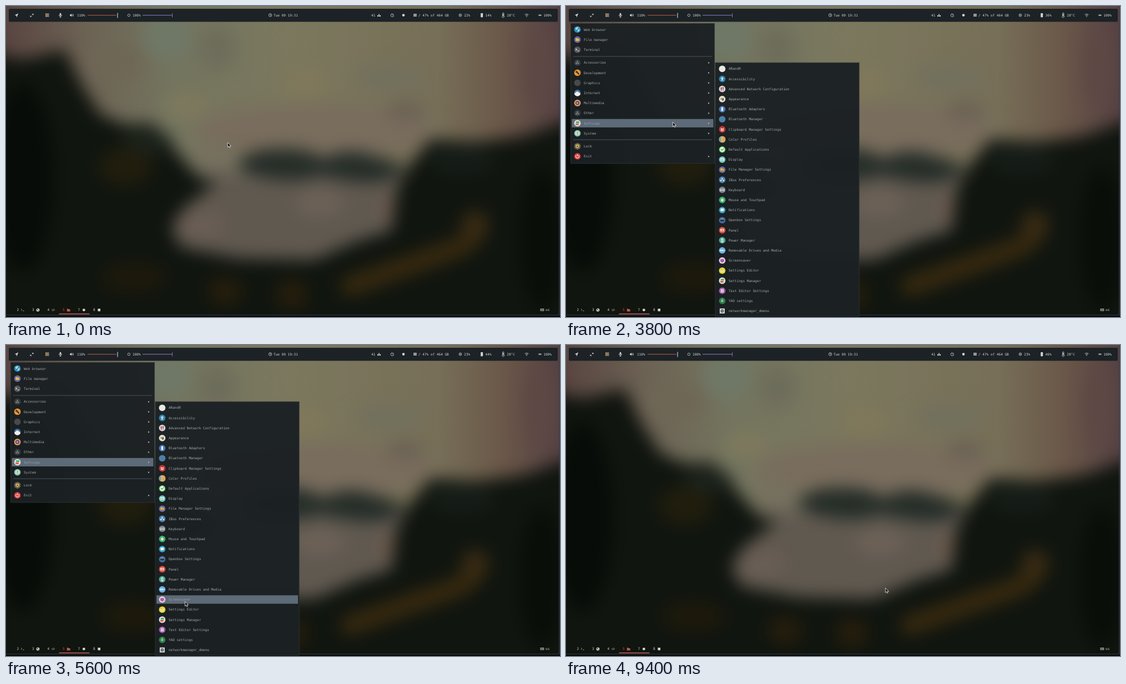
An HTML page that plays this animation: 998x561 px, repeating every 9.9 s.

```html
<!DOCTYPE html>
<html lang="en">
<head>
<meta charset="utf-8">
<title>Desktop menu</title>
<style>
html, body { margin: 0; width: 100%; height: 100%; overflow: hidden; background: #0a0f0c; }
svg { position: absolute; inset: 0; width: 100%; height: 100%; }
text { font: 6.07px "DejaVu Sans Mono", monospace; text-rendering: geometricPrecision; white-space: pre; }
.blur { filter: blur(15px); }
.bar { fill: #d3d6d1; }
.bar .line { fill: none; stroke: #d3d6d1; stroke-width: .8; }
.menu { fill: #a7abaa; }
.box { fill: #1b2124; fill-opacity: .97; stroke: #30383b; stroke-width: .8; }
.pick { fill: #5d6a77; }
.on { fill: #98a1a7; }
</style>
</head>
<body>
<svg viewBox="0 0 998 561" preserveAspectRatio="none">
  <defs>
    <linearGradient id="sky">
      <stop stop-color="#594541"/><stop offset=".14" stop-color="#6c6254"/>
      <stop offset=".3" stop-color="#74755f"/><stop offset=".52" stop-color="#7b785e"/>
      <stop offset=".78" stop-color="#776f57"/><stop offset=".9" stop-color="#6a5749"/>
      <stop offset="1" stop-color="#564143"/>
    </linearGradient>
  </defs>
  <rect width="998" height="561" fill="url(#sky)"/>
  <g class="blur">
    <ellipse cx="290" cy="55" rx="45" ry="45" fill="#6f7866"/>
    <ellipse cx="380" cy="75" rx="35" ry="40" fill="#6d6d5b"/>
    <ellipse cx="200" cy="100" rx="50" ry="35" fill="#6f6756"/>
    <ellipse cx="690" cy="130" rx="60" ry="25" fill="#72705d"/>
    <ellipse cx="560" cy="225" rx="220" ry="50" fill="#796d5d"/>
    <ellipse cx="720" cy="190" rx="35" ry="18" fill="#6c6255"/>
    <ellipse cx="325" cy="180" rx="40" ry="25" fill="#7d795d"/>
    <ellipse cx="540" cy="140" rx="36" ry="26" fill="#81785a"/>
    <ellipse cx="380" cy="270" rx="40" ry="30" fill="#76705f"/>
    <ellipse cx="960" cy="110" rx="25" ry="70" fill="#5d4845"/>
    <path d="M300 300H720V470H280z" fill="#605950"/>
    <ellipse cx="350" cy="395" rx="45" ry="30" fill="#695d54"/>
    <ellipse cx="565" cy="355" rx="45" ry="25" fill="#6c6157"/>
    <ellipse cx="685" cy="365" rx="16" ry="24" fill="#6a584c"/>
    <path d="M-60 78L30 96 105 78 135 140 170 195 215 214 265 212 310 265 350 312 380 318 320 365 298 400 315 435 420 455 555 458 630 425 695 405 703 335 725 290 765 240 850 245 930 235 1060 190V640H-60z" fill="#10150f"/>
    <path d="M415 285q20-28 80-28t75 20q35-22 75-12t75 25q-30 33-80 28t-70-14q-40 16-90 8t-65-27z" fill="#252d28"/>
    <ellipse cx="30" cy="310" rx="55" ry="170" fill="#070c08"/>
    <ellipse cx="255" cy="245" rx="45" ry="22" fill="#1c231c"/>
    <ellipse cx="820" cy="275" rx="60" ry="25" fill="#161d18"/>
    <ellipse cx="215" cy="290" rx="50" ry="35" fill="#201d0d"/>
    <ellipse cx="230" cy="490" rx="60" ry="28" fill="#1d190c"/>
    <ellipse cx="395" cy="515" rx="32" ry="26" fill="#251d0c"/>
    <ellipse cx="515" cy="520" rx="30" ry="28" fill="#251d0c"/>
    <path d="M620 505Q720 470 790 445T845 392" fill="none" stroke="#37290f" stroke-width="36" stroke-linecap="round"/>
    <ellipse cx="845" cy="392" rx="25" ry="22" fill="#3a2b14"/>
    <ellipse cx="965" cy="420" rx="40" ry="130" fill="#0a0e09"/>
  </g>
  <path d="M0 557.5H996.5V0" fill="none" stroke="#343c4c"/>
  <path d="M0 558.5H998V561H0z" fill="#080a0b"/>
</svg>
<svg viewBox="0 0 998 561" preserveAspectRatio="none">
  <g class="bar">
    <rect x="5" y="5" width="989" height="23.5" rx="2" fill="#1c2225"/>
    <path d="M22.3 13.3L15.7 16.6 18.6 17.2 19.2 20.4z"/>
    <path d="M46.6 13.9H49.5V16.8zM43.5 16.9V19.8H46.4z"/>
    <path class="line" d="M44.5 18.8L46 17.3M47 16.3L48.6 14.8"/>
    <path d="M71 14.4H77.4M71 16.6H77.4M71 18.8H77.4" fill="none" stroke="#dcb886" stroke-width="1.6" stroke-dasharray="1.7 .6"/>
    <rect x="96.7" y="12.8" width="2.7" height="4.8" rx="1.3"/>
    <path class="line" d="M95.4 16q.1 2.8 2.6 2.8t2.6-2.8M98 18.8V20.3M96.5 20.3H99.6"/>
    <path d="M115 15.5H116.4L118.3 13.8V19.4L116.4 17.8H115z"/>
    <path class="line" d="M119.3 15.3q1 1.4 0 2.7M120.6 14.3q1.8 2.4 0 4.7"/>
    <path d="M147 16.6H198.5" stroke="#a34f47" stroke-width="1.2"/>
    <path d="M201 12.4V21.4" stroke="#a9c4dc" stroke-width="1.3"/>
    <circle class="line" cx="221.4" cy="16.7" r="2.2"/>
    <path d="M246 16.6H298.5" stroke="#7d6ca8" stroke-width="1.2"/>
    <path d="M299.5 13.3V20.3" stroke="#8f82a8"/>
    <circle class="line" cx="476" cy="16.5" r="2.7"/>
    <path class="line" d="M476 14.8V16.8H477.4"/>
    <path d="M670.6 16.3L672 14 673.4 16.3zM669 19V16.7H671.6V19zM672.4 19V16.7H675V19z"/>
    <path class="line" d="M696 14a2.8 2.8 0 1 0 2.6 3.5q-2.8.5-2.6-3.5M697.3 14l1.4 2"/>
    <circle cx="716" cy="16.6" r="2.3"/>
    <path d="M734 14H739.8V19H734z" fill="#aeb2ae"/>
    <path d="M734 15.6H739.8M734 17.4H739.8" stroke="#4a5052" stroke-width=".5"/>
    <circle class="line" cx="818.4" cy="16.6" r="2.4"/><circle cx="818.4" cy="16.6" r="1"/>
    <path d="M855.3 13H859V20.3H855.3z"/>
    <path d="M854.7 14.3h5M854.7 16.5h5M854.7 18.7h5" stroke="#d3d6d1" stroke-width=".5"/>
    <path class="line" d="M894.5 17.2V13.4a1.2 1.2 0 0 1 2.4 0V17.2a2 2 0 1 1-2.4 0z"/>
    <path d="M895.7 14V19" stroke="#d3d6d1" stroke-width="1.1"/>
    <path class="line" d="M934.6 15.7q3.4-2.8 6.8 0M936 17.2q2-1.5 4 0"/><circle cx="938" cy="18.7" r=".8"/>
    <path d="M959.3 15.4H964V17.8H959.3zM964.2 16H964.9V17.3H964.2z" fill="#9db2a8"/>
    <text x="128" y="19">110%</text><text x="228" y="19">100%</text>
    <text x="482" y="19">Tue 09 19:31</text><text x="658" y="19">41</text>
    <text x="743" y="19">/ 47% of 464 GB</text>
    <text id="cpu" x="825.3" y="19"></text><text id="ram" x="863.6" y="19"></text>
    <text x="902.3" y="19">28°C</text><text x="968.3" y="19">100%</text>
    <g id="spaces"></g>
    <path class="line" d="M27.2 546.5l1.8 1.5-1.8 1.5M30 550h2.8" opacity=".8"/>
    <circle cx="57.5" cy="548.3" r="2.9"/><path d="M56 546.6l2 .5-.8 1.5-1.4.1zM58 549.3l1.5-.5-.6 1.6z" fill="#182019"/>
    <path class="line" d="M84 546.8l-1.6 1.5 1.6 1.5M86.2 546.8l1.6 1.5-1.6 1.5M85.6 546.2l-1 4.2" opacity=".7"/>
    <path d="M109.8 546h2.2l.8.9h2.8v4.2h-5.8z" fill="#c05850"/>
    <path d="M95.5 555.4H150.5" stroke="#b0564e" stroke-width="1.6"/>
    <circle cx="140.3" cy="548.3" r="2.4"/>
    <rect x="165.4" y="546" width="4.6" height="4.6"/>
    <rect class="line" x="963" y="546.4" width="5.8" height="3.4"/>
    <path d="M964 547.7h4M964.5 548.9h3" stroke="#d3d6d1" stroke-width=".5"/>
    <text x="972" y="550.4">us</text>
  </g>
  <g id="main" class="menu"></g>
  <g id="sub" class="menu"></g>
  <path id="arrow" d="M.3.3V8.6L2.3 6.8 3.6 9.7 5 9 3.8 6.3H6.4z" fill="#111" stroke="#eee" stroke-width=".8"/>
  <path id="hand" d="M1.6 8V6.4L-1.3 4.4Q-1.3 3.2.9 3.9V.2Q1.6-.9 2.4.2V2.4L6 3.2Q7 3.6 6.6 5L6 8z" fill="#111" stroke="#eee" stroke-width=".8"/>
</svg>
<script>
const $ = id => document.getElementById(id);
const PITCH = 18.2, SUB_TOP = 113.3;
const sheet = 'M-2.6-3H2.6V3H-2.6z', screen = 'M-3.2-2.5H3.2V2H-3.2z', folder = 'M-3-2.5H0L.8-1.5H3V2.5H-3z';
const dots = 'M-3 0h2.6v2.6H-3zM.3 0h2.6v2.6H.3zM-1.5-3H1.2V-.5H-1.5z';
const toggles = 'M-2.5-3.2H3.2V-.4H-2.5z';

// label, disc colour, glyph path, glyph colour, second glyph, its colour
const mainItems = [
  ['Web browser', '#2d8fbd', 'M-4-2Q-1-5 2-4L0-1-2 1zM1 0L4-1 3 3 0 4z', '#b9dce0'],
  ['File manager', '#6c6ba8', folder, '#f0bd3d'],
  ['Terminal', '#56575b', 'M-3.2-2.7L-.3-.3-3.2 2.1V.9L-1.8-.3-3.2-1.5zM0 1.6H3.4V2.6H0z'],
  ['Accessories', '#343c40', dots, '#578f83', 'M-3 0h2.6v2.6H-3z', '#b65a55'],
  ['Development', '#e9972f', 'M-3.4-2.2L-1.8-3.8.2-1.8 3.8 2 2.2 3.6-1.5 0-3.2-.4z', '#3b3530'],
  ['Graphics', '#48494a', '', ''],
  ['Internet', '#4b77ad', 'M-5.2 3A2.3 2.3 0 0 1-3.2-.2 3.3 3.3 0 0 1 3-.4 2.6 2.6 0 0 1 5.2 3Q3 6 0 6T-5.2 3z', '#f4f2ec'],
  ['Multimedia', '#ec9a5c', 'M-3.7 0A3.7 3.7 0 1 1 3.7 0 3.7 3.7 0 1 1-3.7 0', '#51557d', 'M-1.2-2L2 0-1.2 2z', '#f3b07d'],
  ['Other', '#343c40', dots, '#578f83', 'M-3 0h2.6v2.6H-3z', '#b65a55'],
  ['Settings', '#e3ded5', toggles, '#3fae62', 'M-3.3.5H2.3V3.3H-3.3z', '#dc5850'],
  ['System', '#74bdc4', 'M-4 0A4 4 0 1 1 4 0 4 4 0 1 1-4 0', '#d5dfae', 'M-.6-2.5H.6V1H-.6zM-.6 1.8H.6V2.8H-.6z', '#4c8f96'],
  ['Lock', '#656152', 'M-3-3H3V2H-3zM-1.5 2H1.5V3.3H-1.5z', '#d9b755', 'M-1.2-1H1.2V1.2H-1.2z', '#4b4a45'],
  ['Exit', '#d63a37', 'M-.6-4H.6V0H-.6zM-2-2.8A3.5 3.5 0 1 0 2-2.8L1.4-1.9A2.4 2.4 0 1 1-1.4-1.9z']
];
const subItems = [
  ['ARandR', '#e8e8e4', '', ''],
  ['Accessibility', '#2b83ae', 'M-3-1.7H3V-.7H1V.5L2 3.4H1L0 1.3-1 3.4H-2L-1 .5V-.7H-3zM-.8-3.6H.8V-2.1H-.8z'],
  ['Advanced Network Configuration', '#ddd3d4', 'M-2.8-3H-.4V1H-1V3.5H-2.2V1H-2.8z', '#bd5368', 'M.6-3.5H2.8V0H2.2V3H1.2V0H.6z', '#6b7890'],
  ['Appearance', '#e5dfd0', 'M-3-2H0V1H-3z', '#8a9b77', 'M0 0L2-3 3 2 0 3z', '#58514b'],
  ['Bluetooth Adapters', '#4a7ab8', 'M-1.7-3.4H1.7V3.4H-1.7z', '#f0f2f4'],
  ['Bluetooth Manager', '#4c80a9', '', ''],
  ['Clipboard Manager Settings', '#ca3535', 'M-2.5-2.5H2.5V3H-2.5z', '#f0d9cc', 'M-1.3-3.3H1.3V-1.5H-1.3zM-1.5 0H1.5V1H-1.5z', '#9b2f2f'],
  ['Color Profiles', '#d9b575', 'M-2-5.6A6 6 0 0 0-2 5.6z', '#7fa39b', 'M1-5.9A6 6 0 0 1 1 5.9z', '#e0a25d'],
  ['Default Applications', '#4dc351', 'M-4.4 0A4.4 4.4 0 1 1 4.4 0 4.4 4.4 0 1 1-4.4 0', '#f1f4ee', 'M-2.8-.3L-1.7-1.3-.5.5 2.6-2.7 3.4-1.8-.5 2.5z', '#43a647'],
  ['Display', '#72cabe', screen, '#e5efeb', 'M-2.4 0L0-1 2.4 1H-2.4z', '#8fb9ad'],
  ['File Manager Settings', '#6c6ba8', folder, '#f0bd3d', 'M-1 0H1V1.8H-1z', '#8b7047'],
  ['IBus Preferences', '#4f83b0', 'M-3.6 0H-1V2.6H-3.6zM1 0H3.6V2.6H1zM-1.3-3H1.3V-.6H-1.3z', '#d9e3ea'],
  ['Keyboard', '#747c85', 'M-4.2-2.2H4.2V2.4H-4.2z', '#cdd2d5', 'M-3.3-1.2H3.3V-.6H-3.3zM-3.3.1H3.3V.6H-3.3zM-2 1.3H2V1.8H-2z', '#5f686f'],
  ['Mouse and Touchpad', '#35b27c', 'M-2.4-1Q0-5 2.4-1V1Q0 5-2.4 1z', '#f0e3ac', 'M-2.4-.8Q-2-3-.2-3.2V-.8z', '#e7b957'],
  ['Notifications', '#36a2c8', 'M-3-2.8H3V2H0L-1.5 3.5V2H-3z', '#edf4f5'],
  ['Openbox Settings', '#466a9d', screen, '#26344a', 'M-3.2-2.5H3.2V-1.3H-3.2z', '#a8bbd2'],
  ['Panel', '#df4c3f', screen, '#f4e8d7', 'M-1.5-1.2H2V.8H-1.5z', '#d2705c'],
  ['Power Manager', '#4ca895', 'M-2-3H-.8V-3.7H.8V-3H2V3.5H-2z', '#d7e9df', 'M-.3-1.8H.7L.2 0H1L-.7 2.6-.3.7H-1z', '#4ca895'],
  ['Removable Drives and Media', '#69b0e4', 'M-4-1.3H1.6V1.3H-4zM2-.9H4V.9H2z', '#e7f1f7', 'M-2.8-.3H.3V.3H-2.8z', '#69b0e4'],
  ['Screensaver', '#e8c9e6', screen, '#a45b9c', 'M-1.5 2H1.5V3.2H-1.5z', '#7b5078'],
  ['Settings Editor', '#e5d52e', 'M-3-1.5H3V2.6H-3z', '#f3edcf', 'M-3-2.5H0V-1.5H-3zM-1.8 0H1.8V.9H-1.8z', '#b7a941'],
  ['Settings Manager', '#e3ded5', toggles, '#3fae62', 'M-3.3.5H2.3V3.3H-3.3z', '#dc5850'],
  ['Text Editor Settings', '#a85bad', sheet, '#eee4ee', 'M-1.6-1.6H1.6V-1H-1.6zM-1.6 0H1.6V.6H-1.6zM-1.6 1.5H1V2.1H-1.6z', '#9871a0'],
  ['YAD settings', '#2f7f4c', 'M-1-3.5H1V-.5H3L0 2.6-3-.5H-1z', '#98cbaa'],
  ['networkmanager_dmenu', '#d9dadb', 'M-.7-3H.7V-2L2-2.5 2.7-1.5 2-.7H3V.7H2L2.7 1.7 1.8 2.6.7 2V3H-.7V2L-1.8 2.6-2.7 1.7-2 .7H-3V-.7H-2L-2.7-1.5-1.8-2.5-.7-2z', '#4b5052', 'M-1 0A1 1 0 1 1 1 0 1 1 0 1 1-1 0', '#d9dadb']
];

const mainY = i => 42.4 + PITCH * i + 5.2 * ((i > 2) + (i > 10));
const subY = i => SUB_TOP + PITCH * i;

function row(x, y, [label, disc, glyph, ink = '#eee', extra = '', tint = ''], cls = '') {
  const back = label == 'networkmanager_dmenu'
    ? `<rect x="-4.5" y="-4.5" width="9" height="9" fill="${disc}"/>` : `<circle r="5.9" fill="${disc}"/>`;
  return `<g transform="translate(${x} ${y})">${back}<path d="${glyph}" fill="${ink}"/>
    <path d="${extra}" fill="${tint}"/></g><text class="${cls}" x="${x + 11.5}" y="${y + 2.1}">${label}</text>`;
}
const pick = (x, y, id = '') => `<rect id="${id}" class="pick" x="${x}" y="${y - 7.6}" width="255" height="15.2"/>`;

$('main').innerHTML = '<rect class="box" x="8.4" y="31.4" width="259.2" height="252.6"/>' +
  '<path d="M13 91H263M13 241.2H263" stroke="#525a5d" stroke-width=".9"/>' + pick(10.5, mainY(9), 'mainPick') +
  mainItems.map((item, i) => row(20.6, mainY(i), item, i == 9 ? 'on' : '') +
    (i > 2 && i != 11 ? `<path d="M256 ${mainY(i) - 1.5}l2.8 1.7-2.8 1.7z"/>` : '')).join('');
$('sub').innerHTML = '<rect class="box" x="268.9" y="102.2" width="259.2" height="457"/>' + pick(271, 0, 'subPick') +
  subItems.map((item, i) => row(281.4, subY(i), item)).join('');
const labels = $('sub').querySelectorAll('text');

[2, 3, 4, 5, 7, 8].forEach((n, i) => {
  $('spaces').innerHTML += `<text x="${19.6 + 27.5 * i}" y="550.4"${n == 5 ? ' fill="#c05850"' : ''}>${n}</text>`;
});

// Pointer track: time, x, y; a fourth value eases the approach
const track = [
  [0, 399, 246], [400, 399, 246], [1300, 43, 31, 1], [1400, 43, 31], [2000, 19, 19], [3700, 19, 19],
  [3800, 192, 209], [4500, 300, 207, 1], [4700, 300, 207], [5200, 323, 400], [5700, 322, 478], [5900, 322, 492],
  [6000, 322, 492], [6200, 315, 492], [6400, 315, 492], [6500, 274, 494], [6600, 274, 494],
  [7200, 355, 497, 1], [7600, 355, 497], [7700, 361, 497], [7800, 361, 497], [8000, 562, 441],
  [8100, 562, 441], [8200, 575, 438], [9900, 575, 438]
];
function pointer(t) {
  const i = track.findIndex(k => k[0] > t), a = track[i - 1], b = track[i];
  let k = (t - a[0]) / (b[0] - a[0]);
  if (b[3]) k = k * k * (3 - 2 * k);
  return [a[1] + (b[1] - a[1]) * k, a[2] + (b[2] - a[2]) * k];
}
const latest = (t, steps) => steps.filter(s => s[0] <= t).pop()[1];
const show = (id, on) => $(id).style.display = on ? '' : 'none';

let last = -1;
function draw(now) {
  requestAnimationFrame(draw);
  const t = Math.floor(Math.max(0, now - start) % 9900 / 100) * 100;
  if (t == last) return;
  last = t;
  const [x, y] = pointer(t), onIcon = x < 30 && y < 28;
  for (const id of ['arrow', 'hand']) $(id).setAttribute('transform', `translate(${x} ${y})`);
  show('hand', onIcon);
  show('arrow', !onIcon);
  show('main', t >= 2200 && t < 8800);
  show('sub', t >= 3800 && t < 8800);
  const inside = x >= 271 && x <= 526, current = inside ? Math.round((y - SUB_TOP) / PITCH) : -1;
  show('subPick', inside);
  $('subPick').setAttribute('y', subY(current) - 7.6);
  labels.forEach((label, i) => label.setAttribute('class', i == current ? 'on' : ''));
  $('cpu').textContent = latest(t, [[0, '22%'], [1500, '23%']]);
  $('ram').textContent = latest(t, [[0, '14%'], [1500, '13%'], [3800, '36%'], [5400, '44%'], [7400, '47%'], [9400, '46%']]);
}
const start = performance.now();
draw(start);
</script>
</body>
</html>
```
